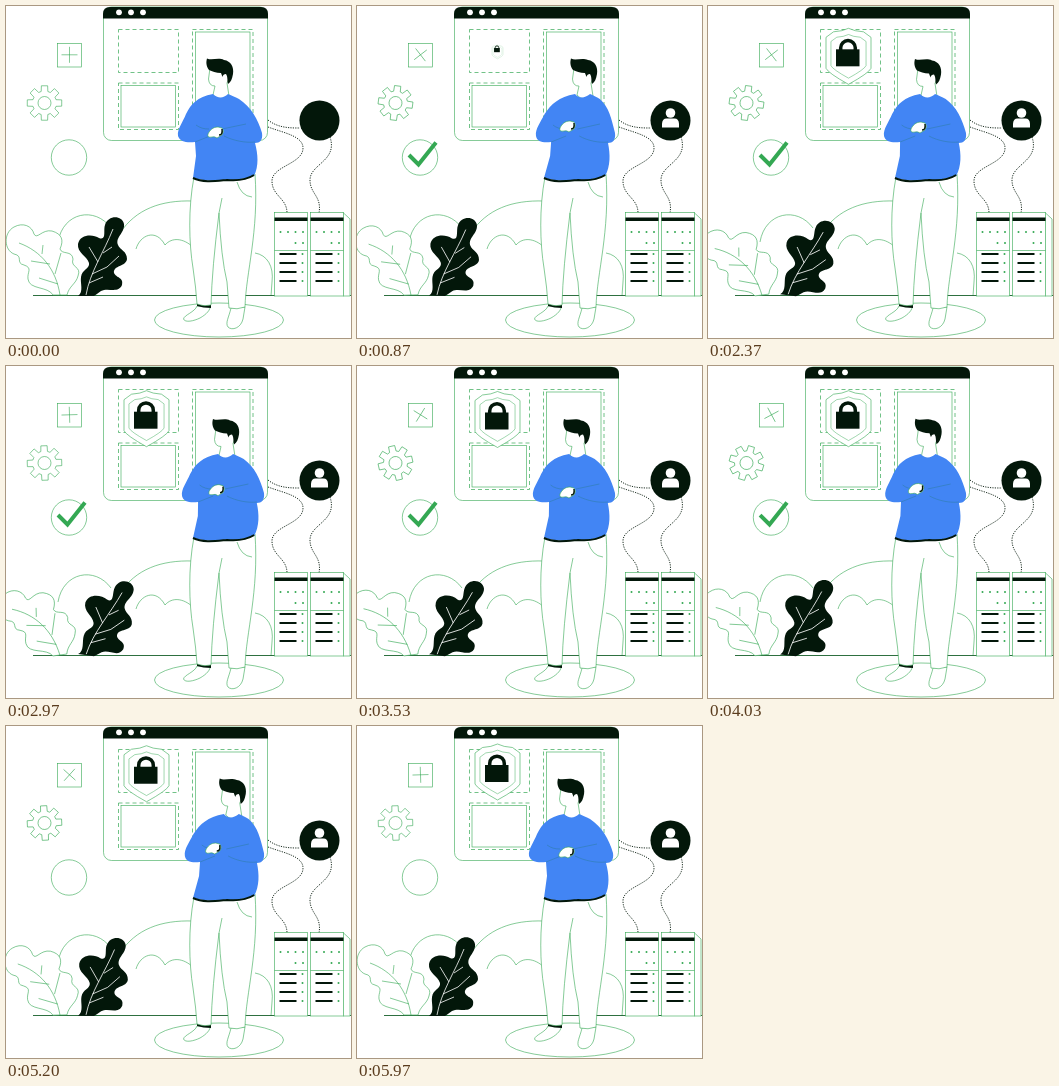
An HTML page that plays this animation: 345x332 px, repeating every 6 s.

```html
<!DOCTYPE html>
<html lang="en">
<head>
<meta charset="utf-8">
<title>Secure hosting</title>
<style>
  html, body { margin: 0; width: 100%; height: 100%; overflow: hidden; background: #fff; }
  svg { display: block; width: 345px; height: 332px; }
  .line { fill: none; stroke: #34a853; stroke-width: .6; }
  .paper { fill: #fff; stroke: #34a853; stroke-width: .6; }
  .dash { fill: none; stroke: #34a853; stroke-width: .7; stroke-dasharray: 4 3; }
  .dark { fill: #03170a; }
  .white { fill: #fff; }
  .wire { fill: none; stroke: #03170a; stroke-width: .9; stroke-dasharray: 1.2 1.2; }
  .vein { fill: none; stroke: #fff; stroke-width: .8; }
</style>
</head>
<body>
<svg viewBox="0 0 345 332">
  <!-- hills and ground -->
  <path class="line" d="M52 236C57 206 89 200 105 222M114 227C130 203 155 194 187 195M130 243C134 229 150 222 159 239C166 231 177 232 187 241M249 247C261 249 268 260 266 276L265 290"/>
  <path class="line" style="stroke:#17602b;stroke-width:.9" d="M27 289.500H345"/>

  <!-- browser window -->
  <rect class="paper" x="97.500" y="1" width="164" height="133.500" rx="8"/>
  <path class="dark" d="M97 12.500V8Q97 1 104 1H255Q262 1 262 8V12.500Z"/>
  <g class="white"><circle cx="113" cy="6.300" r="2.900"/><circle cx="125" cy="6.300" r="2.900"/><circle cx="137" cy="6.300" r="2.900"/></g>
  <rect class="dash" x="112.500" y="23.500" width="60" height="43"/>
  <rect class="dash" x="112.500" y="77" width="60" height="46.500"/>
  <rect class="line" x="115" y="79.500" width="54.500" height="41.500"/>
  <rect class="dash" x="186.500" y="23.500" width="60.500" height="100"/>
  <rect class="line" x="189.500" y="26" width="54.500" height="95"/>

  <g id="shield">
    <path id="crest" class="paper" d="M-22.500 -19L-15 -24.500Q-6 -25 0 -28Q6 -25 15 -24.500L22.500 -19V12Q20 17 0 28Q-20 17 -22.500 12Z"/>
    <use href="#crest" transform="scale(.78)"/>
  </g>
  <g id="lock">
    <path d="M-7.300 -3V-5.500A7.300 7.300 0 0 1 7.300 -5.500V-3" fill="none" stroke="#03170a" stroke-width="3.500"/>
    <rect class="dark" x="-12" y="-4" width="23.500" height="17"/>
  </g>

  <!-- floating symbols -->
  <rect class="line" x="51.500" y="37.500" width="24" height="23.500"/>
  <path id="plus" class="line" d="M-8 0H8M0 -8V8"/>
  <g id="gear"><path id="cog" class="paper"/><circle class="line" r="6.500"/></g>
  <circle class="line" cx="63" cy="151.500" r="17.700"/>
  <path id="check" d="M52 149L61.500 158.500L79 136.500" pathLength="100" fill="none" stroke="#34a853" stroke-width="4"/>

  <!-- leaves -->
  <g id="paleLeaf">
    <path class="paper" d="M47 289C42 280 23 284 22 273C21 266 27 262 18 259C9 257 18 250 8 248C-2 244 -3 227 8 221C17 216 26 220 28 228C31 234 36 223 46 225C56 228 58 234 54 243C56 249 66 244 67 253C64 262 76 260 72 270C70 278 63 280 61 289Z"/>
    <path class="line" d="M54 289C50 263 35 245 13 237M49 268L55 247M44 258L25 255M52 278L33 272M36 248L37 239"/>
  </g>
  <g id="darkLeaf">
    <path class="dark" d="M72 290C78 286 74 277 75 271C76 263 84 263 83 257C81 250 71 247 72 238C74 228 87 228 93 232C101 235 97 224 99 219C102 209 116 209 118 218C119 227 109 231 112 239C114 244 121 245 121 253C120 261 107 259 108 267C110 272 118 271 116 279C112 288 102 281 95 285Q91 288 88 290Z"/>
    <path class="vein" d="M80 289C84 266 98 246 107 223M92 256L83 241M86 268L101 261L113 250M83 277L97 271M97 247L106 241"/>
  </g>

  <!-- wires and account badge -->
  <path class="wire" d="M262 114C272 122 284 122 294 122M262 121C278 127 297 130 297 142C297 158 266 160 266 175C266 190 281 192 281 207M324 131C332 155 304 158 304 174C304 188 316 190 313 207"/>
  <circle class="dark" cx="313.500" cy="114.500" r="20"/>
  <g id="user" class="white"><circle cy="-7.500" r="4.800"/><path d="M-8.500 7V3Q-8 -2 -4 -2H4Q8 -2 8.500 3V7Z"/></g>

  <!-- servers -->
  <path class="paper" d="M337 206.500L344 213V290H337Z"/>
  <g id="servers"></g>

  <!-- person -->
  <ellipse class="paper" cx="213" cy="314" rx="64.500" ry="17"/>
  <path class="paper" d="M191 300C189 306 178 309 177.500 313C179 317 188 315 194 312C201 308 204 304 204.500 300ZM225 302C223 311 219 317 222 321C226 325 235 322 237 313L239 301Z"/>
  <path class="dark" d="M191 298L205 299V302Q197 302 191 300Z"/>
  <path class="paper" d="M188 171C182 202 183 238 187 262Q190 282 191 298Q198 301 205 299Q206 262 213 207Q215 251 221 276L223 302Q231 304 239 301C240 266 253 226 249 168Z"/>
  <path class="line" d="M213 207L216 192M231 176Q235 190 246 191"/>
  <g id="head">
    <path class="paper" d="M204 62L202.500 73Q203 80 209 80L207 89Q213 96 223 90L221 77L224 70L220 62Z"/>
    <path class="dark" d="M201 52.500C206 55 212 51 218 54C225 55 228 61 227 68C226 73 225 76 222 78C221 74 222 71 220 68Q217 68 216.500 71L215 67C210 67 206 65 203 64C200 60 200 56 201 52.500Z"/>
  </g>
  <path id="shirt" fill="#4285f4"/>
  <path id="folds" class="line" style="stroke:#2f7fae"/>
  <path id="hem" fill="none" stroke="#03170a" stroke-width="2"/>
  <path id="fingers" class="white" d="M225 118L230 116L232 123Q229 121 225 120Z"/>
  <g id="hand">
    <path class="paper" d="M-8 2C-6 -2 -3 -5 2 -5L6 -4Q9 -1 6 3L1 6Q-2 4 -4 5Q-9 6 -8 2Z"/>
    <path d="M3 3Q7 3 6 -3" fill="none" stroke="#03170a" stroke-width="1.500"/>
  </g>
</svg>
<script>
const LOOP = 6000;
const $ = id => document.getElementById(id);
const clamp = v => Math.max(0, Math.min(1, v));
const smooth = v => { v = clamp(v); return v * v * (3 - 2 * v); };
const phase = (t, from, to) => smooth((t - from) / (to - from));
const wave = v => (1 - Math.cos(2 * Math.PI * v)) / 2;
const mix = (a, b, k) => a + (b - a) * k;
const put = (id, x, y, extra = "") => $(id).setAttribute("transform", `translate(${x} ${y}) ${extra}`);

function track(keys, t) {
  const i = Math.max(1, keys.findIndex(k => k[0] >= t));
  const [t0, a] = keys[i - 1], [t1, b] = keys[i];
  return mix(a, b, phase(t, t0, t1));
}

const headShift = [[0, 0], [870, 13], [1570, 7], [2370, 6], [3000, 6]];
const leftShift = [[0, 0], [870, 7], [1500, 7], [2370, 4], [3000, 4]];
const rightShift = [[0, 0], [870, 2], [3000, 2]];
const handX = [[0, 0], [870, 1], [1570, -1], [2370, 1], [3530, 1], [4530, -4], [LOOP, 0]];
const handY = [[0, 0], [870, -6], [1570, -13], [2370, -5], [3530, 0], [4530, -7], [LOOP, 0]];

const shapes = {
  shirt: "M207 88 C191 91 185 98 180 108 C177 116 171 123 172 130 C174 136 181 137 189 136 L190 150 L187 172 C205 177 232 175 248 170 C253 160 252 148 249 137 C254 137 257 134 256 127 C252 113 245 101 233 93 C229 91 225 89 222 88 C217 93 211 92 207 88Z",
  folds: "M189 136 C194 134 199 132 204 130 M216 123 L240 118 M218 130 C228 135 240 137 249 136 M190 119 C194 122 198 123 203 123",
  hem: "M187 172 C197 177 210 175 221 174 C232 175 242 173 248 169"
};

// Bends the torso: the waist stays, elbows and neck follow their own shifts.
function bend(d, left, right, neck) {
  return d.replace(/(\d+) (\d+)/g, (_, x, y) => {
    const elbow = mix(left, right, clamp((x - 172) / 84)) * clamp((172 - y) / 42);
    return `${+x + mix(elbow, neck, clamp((114 - y) / 25))} ${y}`;
  });
}

function cogPath() {
  const points = [];
  for (let i = 0; i < 8; i++) {
    for (const [r, a] of [[12, -.28], [17.5, -.18], [17.5, .18], [12, .28]]) {
      const angle = i * Math.PI / 4 + a;
      points.push(`${r * Math.cos(angle)} ${r * Math.sin(angle)}`);
    }
  }
  return `M${points.join("L")}Z`;
}

function server(x) {
  let out = `<rect class="paper" x="${x}" y="206.500" width="33" height="83.500"/>
    <rect class="dark" x="${x}" y="211.500" width="33" height="3.500"/>
    <path class="line" d="M${x} 244.500h33"/>`;
  for (let i = 0; i < 4; i++) {
    const y = 248 + i * 9;
    out += `<path d="M${x + 5} ${y}h17" stroke="#03170a" stroke-width="2"/>
      <circle cx="${x + 28}" cy="${y}" r="1" fill="#34a853"/>
      <circle cx="${x + 6 + i * 7.5}" cy="226" r="1" fill="#34a853"/>`;
    if (i > 1) out += `<circle cx="${x + 6 + i * 7.5}" cy="237" r="1" fill="#34a853"/>`;
  }
  return out;
}

$("cog").setAttribute("d", cogPath());
$("servers").innerHTML = server(268.5) + server(304.5);

function render(t) {
  const mirror = Math.min(t, LOOP - t);
  const sway = wave(t / LOOP);
  const turn = t / LOOP * 360;

  put("plus", 63.5, 48.8, `rotate(${turn})`);
  put("gear", 38.5, 97, `rotate(${turn})`);
  $("paleLeaf").setAttribute("transform", `rotate(${-8 * sway} 54 290)`);
  $("darkLeaf").setAttribute("transform", `rotate(${8 * sway} 86 290)`);

  const bob = -5 + 7.5 * wave(Math.max(0, t - 1000) / 5000);
  const grow = `scale(${phase(t, 700, 1230)})`;
  put("shield", 140.5, 51 + bob, grow);
  put("lock", 140, 48 + bob, grow);
  put("user", 313.5, 114.5, `scale(${phase(t, 100, 750)})`);

  const start = 100 * phase(t, 4000, 5000), end = 100 * phase(t, 100, 800);
  const length = Math.max(0, end - start);
  $("check").setAttribute("stroke-dasharray", `${length} 300`);
  $("check").setAttribute("stroke-dashoffset", -start);
  $("check").setAttribute("visibility", length > .1 ? "visible" : "hidden");

  const head = track(headShift, mirror);
  const left = track(leftShift, mirror), right = track(rightShift, mirror);
  for (const id in shapes) $(id).setAttribute("d", bend(shapes[id], left, right, head * .85));
  put("head", head, .5 * sway);
  put("hand", 210 + track(handX, t), 126 + track(handY, t));
  $("fingers").setAttribute("opacity", phase(t, 4150, 4450) * (1 - phase(t, 4650, 4950)));
}

const began = performance.now();
function tick() {
  render((performance.now() - began) % LOOP);
  requestAnimationFrame(tick);
}
tick();
</script>
</body>
</html>
```
